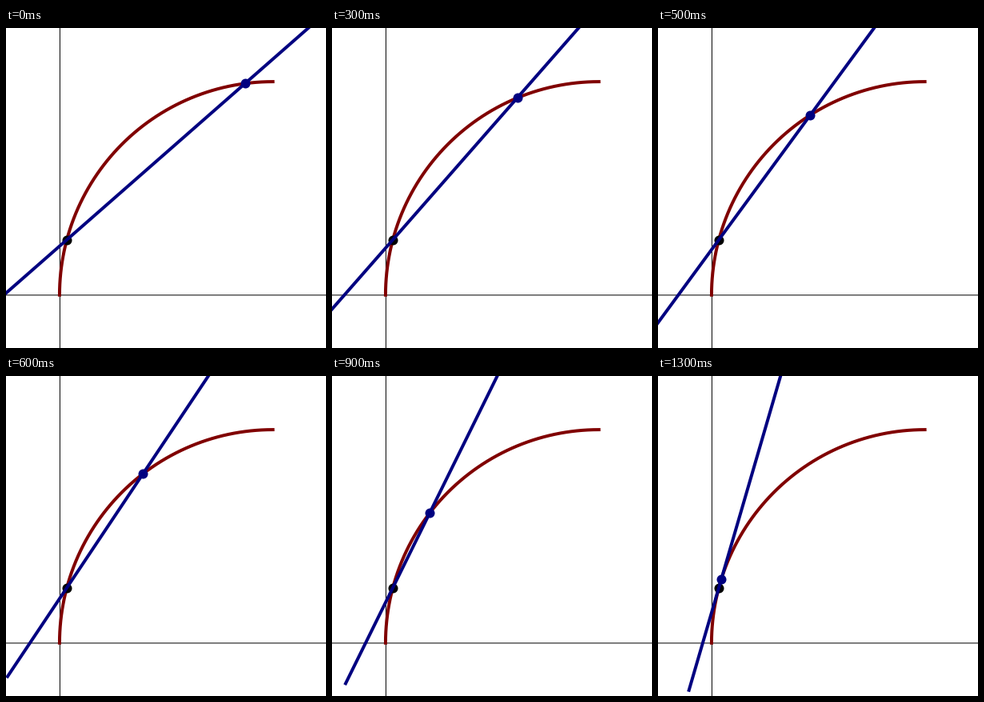
A matplotlib script for the animation above (1.4 s loop, 400x400 px).

```python
import numpy as np
import matplotlib.pyplot as plt
from matplotlib.animation import FuncAnimation

SIZE, DPI = 400, 100
UNIT = SIZE / 1.5                      # pixels per unit, also the arc radius
CENTER = np.array([333.6, 333.75])
FRAMES, INTERVAL = 14, 100
FIXED_ANGLE, START_ANGLE, STEP = 15, 82.5, 5
MAROON, NAVY = "#800000", "#000080"


def px(width):
    return width * 72 / DPI


def on_arc(degrees):
    a = np.radians(degrees)
    return CENTER - UNIT * np.stack([np.cos(a), np.sin(a)], axis=-1)


def dot(point, color, z):
    return ax.plot(*point, "o", color=color, ms=px(12), mew=0, zorder=z)[0]


fig = plt.figure(figsize=(SIZE / DPI, SIZE / DPI), dpi=DPI, facecolor="white")
ax = fig.add_axes([0, 0, 1, 1])
ax.set(xlim=(0, SIZE), ylim=(SIZE, 0))
ax.axis("off")

axis_style = dict(color="black", lw=px(1), snap=False, zorder=1)
ax.plot([67.4, 67.4], [0, SIZE], **axis_style)
ax.plot([0, SIZE], [333.9, 333.9], **axis_style)

stroke = dict(lw=px(4), solid_capstyle="projecting")
ax.plot(*on_arc(np.linspace(0, 90, 181)).T, color=MAROON, zorder=2, **stroke)

anchor = on_arc(FIXED_ANGLE)
dot(anchor, "black", 3)
secant, = ax.plot([], [], color=NAVY, zorder=4, **stroke)
mover = dot(anchor, NAVY, 5)


def update(i):
    point = on_arc(START_ANGLE - STEP * i)
    direction = (point - anchor) / np.hypot(*(point - anchor))
    secant.set_data(*np.array([anchor - 0.5 * UNIT * direction,
                               anchor + 2 * UNIT * direction]).T)
    mover.set_data(*point[:, None])
    return secant, mover


anim = FuncAnimation(fig, update, frames=FRAMES, interval=INTERVAL,
                     repeat=True, repeat_delay=0)
plt.show()
```
